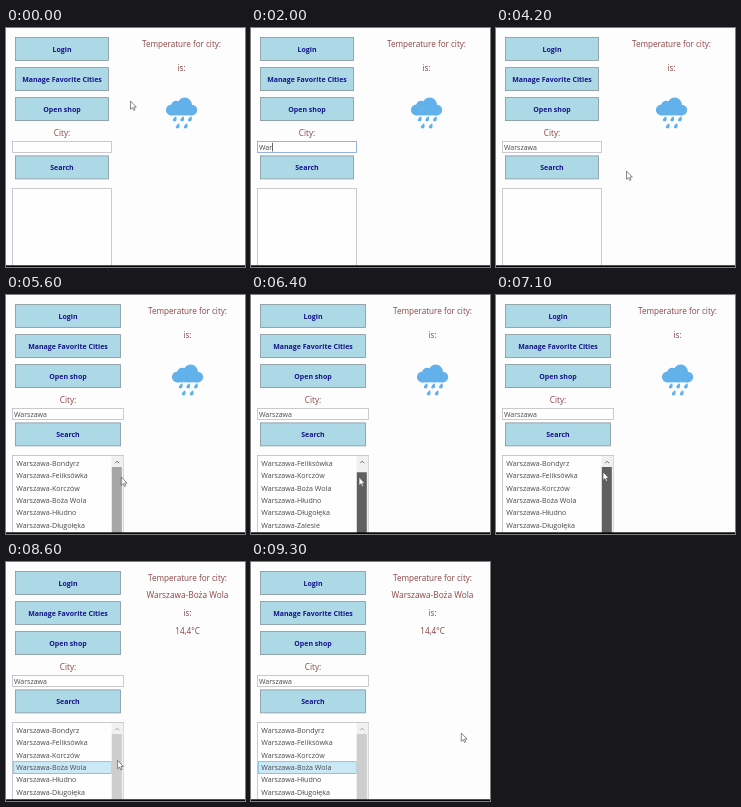
An HTML page for the animation above (9.9 s loop, 239 by 239 pixels).

```html
<!DOCTYPE html>
<html lang="en">
<head>
<meta charset="utf-8">
<title>City temperature</title>
<style>
html, body { margin: 0; width: 100%; height: 100%; overflow: hidden; background: #fdfdfe; }
svg { display: block; width: 100%; height: 100%; }
text { font-family: "Open Sans", "Noto Sans", sans-serif; font-size: 7.1px; fill: #4a4a4a; white-space: pre; }
.button rect { fill: #add8e6; stroke: #84949c; stroke-width: .8; }
.button text { font-size: 7px; font-weight: 700; fill: #14148a; text-anchor: middle; }
.label { font-size: 8.15px; fill: #8a4444; text-anchor: middle; }
.box { fill: #fefefe; stroke: #bdbec4; stroke-width: .8; }
#icon { fill: #62b1ea; }
</style>
</head>
<body>
<svg viewBox="0 0 239 239">
  <rect width="239" height="239" fill="#fdfdfe"/>
  <g id="buttons"></g>
  <text id="cityLabel" class="label" y="107.5">City:</text>
  <rect id="field" class="box" x="6.5" y="113.5" height="11"/>
  <text id="typed" x="8" y="122.1" style="font-size:7px"></text>
  <rect id="caret" y="114.8" width=".7" height="8.6" fill="#222"/>
  <rect id="list" class="box" x="6.5" y="160.5" height="90"/>
  <g id="results">
    <rect id="hover" x="7.2" width="98.2" height="11.8" fill="#e5f3fb" stroke="#8acbea" stroke-width=".7"/>
    <rect id="selected" x="7.2" width="98.2" height="11.8" fill="#cbe8f6" stroke="#5ab4e0" stroke-width=".7"/>
    <g id="rows"></g>
    <rect x="105.6" y="161" width="11.8" height="80" fill="#f0f0f0"/>
    <path id="chevron" d="M109.2 168.2L111.2 166.2L113.2 168.2" fill="none" stroke-width=".9"/>
    <rect id="thumb" x="105.8" width="10" height="90"/>
  </g>
  <g id="weather">
    <text class="label" y="18.8">Temperature for city:</text>
    <text id="city" class="label" y="36.2" style="font-size:8.3px">Warszawa-Boża Wola</text>
    <text id="is" class="label">is:</text>
    <text id="degrees" class="label" y="72">14,4°C</text>
    <g id="icon">
      <circle cx="-10.2" cy="82" r="5.4"/>
      <circle cx="-5.5" cy="77.6" r="4.8"/>
      <circle cx="3.2" cy="76.8" r="7.3"/>
      <circle cx="10.4" cy="82.1" r="5.3"/>
      <rect x="-10.2" y="78" width="20.6" height="9.4"/>
      <g id="drops"></g>
    </g>
  </g>
  <rect y="237.3" width="239" height="1.7" fill="#080808"/>
  <path id="arrow" d="M0 0V8.3L1.9 6.6L3.2 9.4L4.5 8.8L3.3 6.1H5.8Z" fill="#fff" stroke="#555" stroke-width=".7"/>
  <path id="beam" d="M-1.7-4.5H1.7M0-4.5V4.5M-1.7 4.5H1.7" fill="none" stroke="#555" stroke-width=".8"/>
</svg>
<script>
const LOOP = 9900, STEP = 100;
const ROW_TOP = 162.2, ROW_HEIGHT = 12.4, ROW_COUNT = 6;
const places = ["Bondyrz", "Feliksówka", "Korczów", "Boża Wola", "Hłudno", "Długołęka",
  "Zalesie", "Lipowo", "Brzezie", "Kowala", "Nowa Wieś"];

// time, x, y of the pointer
const track = [
  [0, 124.5, 73], [100, 116, 85], [200, 94, 106], [300, 71, 118], [600, 71, 118], [800, 73, 122.8],
  [3200, 75, 124], [3400, 78, 146], [3800, 78, 146], [4200, 130.5, 143], [4400, 131, 142],
  [4800, 138, 122], [5300, 138, 122], [5600, 115.3, 182], [5800, 110, 179], [6300, 108, 177],
  [6700, 108, 198], [7100, 107, 177], [7300, 107, 177], [8100, 95.7, 198], [8200, 95, 203],
  [8500, 95, 203], [9200, 211, 171], [9300, 210.3, 171]
];
const keyTimes = [1400, 1800, 1900, 2200, 2300, 2400, 2500, 2600];

const $ = id => document.getElementById(id);
function set(el, attrs) {
  for (const name in attrs) el.setAttribute(name, attrs[name]);
  return el;
}
function add(parent, tag, attrs, text = "") {
  const el = set(document.createElementNS("http://www.w3.org/2000/svg", tag), attrs);
  el.textContent = text;
  return parent.appendChild(el);
}
const show = (el, on) => set(el, { visibility: on ? "visible" : "hidden" });
const moveTo = (el, x, y) => set(el, { transform: `translate(${x} ${y})` });
const within = (t, from, to) => t >= from && t < to;

const buttons = [["Login", 9.5], ["Manage Favorite Cities", 39.6], ["Open shop", 69.6], ["Search", 127.9]]
  .map(([name, y]) => {
    const group = add($("buttons"), "g", { class: "button" });
    return {
      rect: add(group, "rect", { x: 9.5, y, height: 23 }),
      label: add(group, "text", { y: y + 14.5 }, name)
    };
  });
const rows = Array.from({ length: ROW_COUNT }, (_, i) =>
  add($("rows"), "text", { x: 10.3, y: ROW_TOP + 8.6 + i * ROW_HEIGHT }));
for (const [x, y] of [[-7, 91], [.5, 91], [8.2, 91], [-4, 98], [4, 98]])
  add($("drops"), "path", {
    d: "M1.5-2.8C2.6-.6 2.3 2.4 0 2.4C-2.4 2.4-2.4-.5 1.5-2.8Z",
    transform: `translate(${x} ${y})`
  });

function pointerAt(t) {
  const next = track.findIndex(key => key[0] > t);
  if (next < 0) return track.at(-1).slice(1);
  const [t0, x0, y0] = track[next - 1], [t1, x1, y1] = track[next];
  const k = (t - t0) / (t1 - t0);
  return [x0 + (x1 - x0) * k, y0 + (y1 - y0) * k];
}

function drawLayout(wide) {
  const extra = wide ? 12 : 0, center = 56 + extra / 2;
  for (const { rect, label } of buttons) {
    set(rect, { width: 93 + extra });
    set(label, { x: center });
  }
  set($("cityLabel"), { x: center });
  set($("field"), { width: 99 + extra });
  set($("list"), { width: 99 + extra });
  moveTo($("weather"), 175.5 + extra / 2, 0);
}

function drawField(t) {
  const focused = within(t, 500, 3400);
  const hovered = within(t, 300, 500);
  $("typed").textContent = "Warszawa".slice(0, keyTimes.filter(k => k <= t).length);
  set($("caret"), { x: 8.2 + $("typed").getComputedTextLength() });
  show($("caret"), within(t, 500, 1000) || within(t, 1400, 3200));
  $("field").style.stroke = focused ? "#7f9fdc" : hovered ? "#8fb9e6" : "";
  buttons[3].rect.style.fill = within(t, 3400, 3900) ? "#bee6fd" : "";
}

function drawList(t, x, y) {
  const dragging = within(t, 6300, 7200);
  const overBar = within(t, 5600, 7400) && x > 105;
  const scroll = dragging ? Math.max(0, Math.round((y - 177) / 5)) : 0;
  rows.forEach((row, i) => row.textContent = "Warszawa-" + places[i + scroll]);
  set($("thumb"), {
    y: 172 + (dragging ? y - 177 : 0),
    fill: dragging ? "#606060" : overBar ? "#a6a6a6" : "#cdcdcd"
  });
  set($("chevron"), { stroke: overBar ? "#606060" : "#a0a0a0" });
  const hovered = Math.floor((y - ROW_TOP) / ROW_HEIGHT);
  const rowY = i => ROW_TOP + .3 + i * ROW_HEIGHT;
  set($("hover"), { y: rowY(hovered) });
  set($("selected"), { y: rowY(3) });
  const listed = t >= 4500;
  show($("results"), listed);
  show($("hover"), listed && t >= 7300 && x < 106 && hovered >= 0);
  show($("selected"), t >= 8300);
}

function drawWeather(t) {
  const loaded = t >= 8600;
  show($("city"), loaded);
  show($("degrees"), loaded);
  show($("icon"), !loaded);
  set($("is"), { y: loaded ? 54 : 42.7 });
}

function render(time) {
  const t = Math.floor(time % LOOP / STEP) * STEP;
  const [x, y] = pointerAt(t);
  drawLayout(t >= 4500);
  drawField(t);
  drawList(t, x, y);
  drawWeather(t);
  moveTo($("arrow"), x, y);
  moveTo($("beam"), x, y);
  show($("beam"), within(t, 300, 1400));
  show($("arrow"), t < 300 || t >= 3200);
}

const start = performance.now();
function tick() {
  render(performance.now() - start);
  requestAnimationFrame(tick);
}
tick();
</script>
</body>
</html>
```
